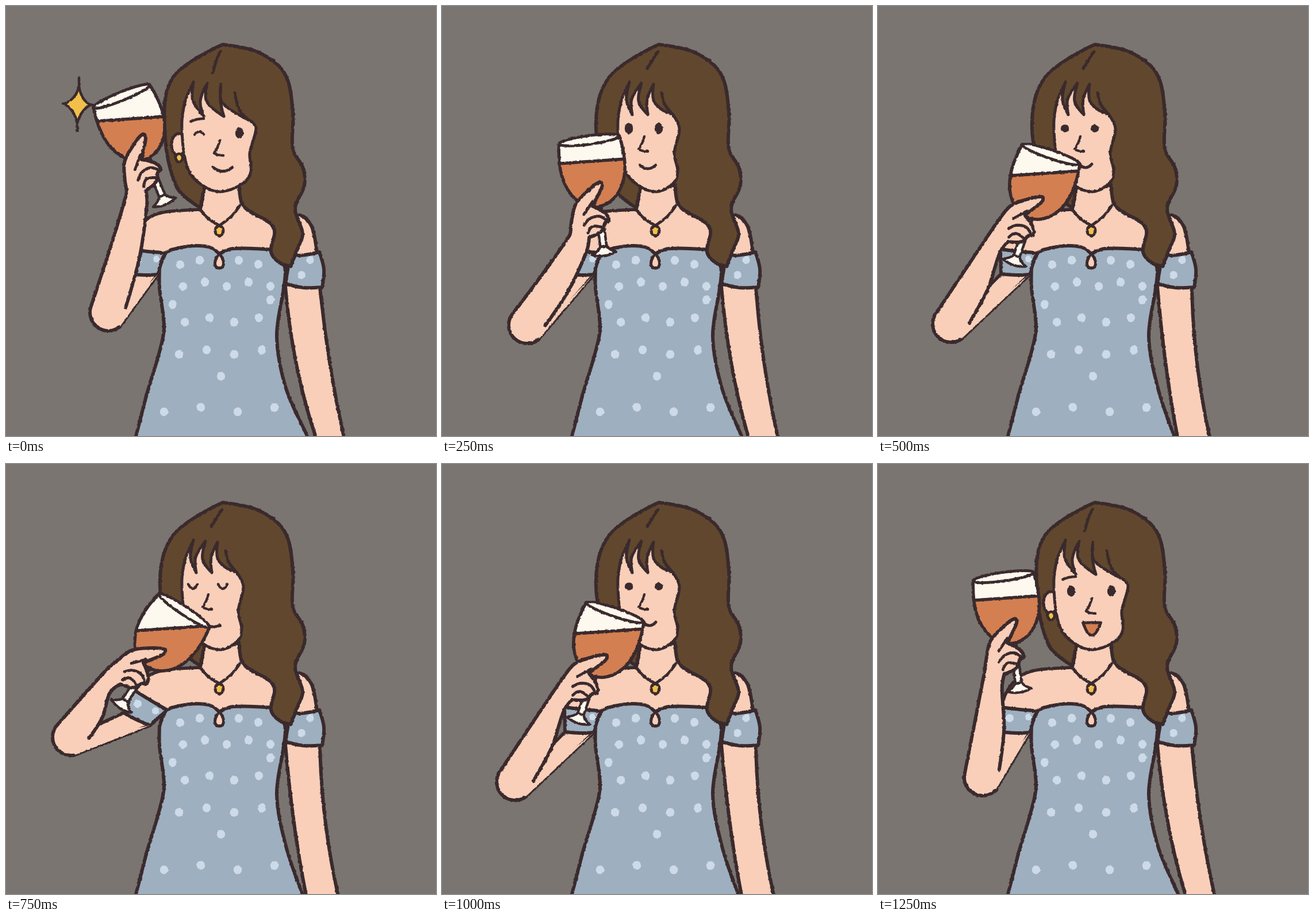
An HTML page for the animation above (1500 ms loop, 748 by 748 pixels).

```html
<!DOCTYPE html>
<html lang="en">
<head>
<meta charset="utf-8">
<title>Cheers</title>
<style>
html, body { margin: 0; width: 100%; height: 100%; overflow: hidden; background: #7a7571; }
svg { display: block; width: 100%; height: 100%; }
</style>
</head>
<body>
<svg id="stage" viewBox="0 0 748 748" fill="none" stroke-linecap="round" stroke-linejoin="round">
  <filter id="rough" filterUnits="userSpaceOnUse" x="0" y="0" width="748" height="748" color-interpolation-filters="sRGB">
    <feTurbulence type="fractalNoise" baseFrequency="0.2" numOctaves="2" seed="4"/>
    <feDisplacementMap in="SourceGraphic" scale="3" xChannelSelector="R" yChannelSelector="G"/>
  </filter>
  <clipPath id="inBowl"><path id="bowl"/></clipPath>
</svg>
<script>
const INK = '#3a2a2d', SKIN = '#f9cfb9', HAIR = '#61472d', DRESS = '#9eafbf', SPOT = '#cddbe9',
      BEER = '#d37f52', CREAM = '#fdf9ee', GOLD = '#f2c04a';
const STEP = 250, ORDER = [0, 1, 2, 3, 2, 4];

// glass: rim centre and tilt; side: head turned to the viewer's right; lift: raised sleeve
const POSES = [
  { glass: [201, 157, -22], elbow: [178, 533], sway: 18, side: 1, lift: 0,
    eyes: ['wink', 'open'], mouth: [377, 284, 34, 7], star: true },
  { glass: [256, 233, -7.5], elbow: [148, 555], sway: 12, side: 0, lift: 0,
    eyes: ['open', 'open'], mouth: [358, 280, 27, 6] },
  { glass: [301, 258, 18.8], elbow: [127, 553], sway: 0, side: 0, lift: 0,
    eyes: ['round', 'round'], mouth: [361, 278, 22, 6] },
  { glass: [310, 255, 33.5], elbow: [113, 475], sway: 1, side: 0, lift: 25,
    eyes: ['closed', 'closed'], mouth: [361, 282, 22, 3] },
  { glass: [218, 196, -8], elbow: [182, 545], sway: 14, side: 1, lift: 0,
    eyes: ['open', 'open'], mouth: [372, 287, 31, 22] }
];

const BOWL = 'M-53 0C-60 40 -58 75 -36 100Q-20 117 0 117Q20 117 36 100C58 75 60 40 53 0';
// Hand outline and finger creases, measured from the rim centre of the glass.
const HAND = '-29,190 -22,168 / -4,163 4,157 / 9,146 16,143 10,129 -9,115 / 1,100 12,82 9,75 -12,86 -38,108 -50,140 -56,161';
const CREASES = ['-8,107 -26,127', '-28,146 -17,136 0,134 13,144', '-23,160 -14,150 3,154'];
const SHOULDER = '213,428 222,400 240,375 265,361 300,356 338,354 / 341,340 345,316';
const NECKLINE = '278,430 300,421 330,417 355,420 371,431 / 395,422 466,424';
const HINGE = [285, 430], ELBOW_R = 32;
const SPOT_ROWS = [[446, 303, 34, 5], [484, 308, 38, 5], [515, 290, 170, 2], [546, 311, 43, 4],
                   [602, 301, 48, 4], [640, 374, 0, 1], [702, 275, 64, 4]];

const parse = text => text.split('/').map(s => s.trim().split(/\s+/).map(p => p.split(',').map(Number)));
const move = (p, v, k) => [p[0] + v[0] * k, p[1] + v[1] * k];
const normal = v => [-v[1], v[0]];
const mid = (a, b) => [(a[0] + b[0]) / 2, (a[1] + b[1]) / 2];

function unit(a, b) {
  const x = b[0] - a[0], y = b[1] - a[1], len = Math.hypot(x, y) || 1;
  return [x / len, y / len];
}

function rotate([x, y], deg) {
  const c = Math.cos(deg * Math.PI / 180), s = Math.sin(deg * Math.PI / 180);
  return [x * c - y * s, x * s + y * c];
}

// Smooth line through each run of points; runs meet in sharp corners.
function curve(source) {
  const runs = typeof source === 'string' ? parse(source) : source;
  let d = '', last = null;
  for (const run of runs) {
    const p = last ? [last, ...run] : run;
    if (!last) d = 'M' + p[0];
    const slope = i => i && i < p.length - 1 ? unit(p[i - 1], p[i + 1]) : [0, 0];
    for (let i = 1; i < p.length; i++) {
      const reach = Math.hypot(p[i][0] - p[i - 1][0], p[i][1] - p[i - 1][1]) / 3;
      d += `C${move(p[i - 1], slope(i - 1), reach)} ${move(p[i], slope(i), -reach)} ${p[i]}`;
    }
    last = p[p.length - 1];
  }
  return d;
}

function add(parent, tag, attrs) {
  const el = document.createElementNS('http://www.w3.org/2000/svg', tag);
  for (const k in attrs) el.setAttribute(k, attrs[k]);
  return parent.appendChild(el);
}
const path = (g, d, fill = 'none', width = 6) =>
  add(g, 'path', { d, fill, stroke: width ? INK : 'none', 'stroke-width': width });
const oval = (g, cx, cy, rx, ry, fill, width = 0) =>
  add(g, 'ellipse', { cx, cy, rx, ry, fill, stroke: width ? INK : 'none', 'stroke-width': width });
const arc = (x, y, w, dip) => `M${x - w / 2} ${y - dip / 2}Q${x} ${y + dip * 1.5} ${x + w / 2} ${y - dip / 2}`;

function drawFarArm(g, sway) {
  const inner = `M486 488Q498 630 ${521 + sway} 750`;
  const outer = `${577 + sway * 0.6} 750Q${548 + sway * 0.6} 620 546 488`;
  path(g, `${inner}L${outer}`, SKIN, 0);
  path(g, `${inner}M${outer}`);
  path(g, curve('494,362 506,363 520,368 533,387 541,430') + 'L480 445', SKIN);
  path(g, curve('494,435 520,433 545,428 / 553,458 550,489 / 518,490 486,483') + 'Z', DRESS);
  oval(g, 529, 442, 6.5, 7, SPOT);
  oval(g, 514, 468, 7, 7, SPOT);
}

function drawSleeve(g, lift) {
  const s = add(g, 'g', { transform: `rotate(${lift} ${HINGE})` });
  path(s, curve('213,423 246,427 280,430 / 264,467 / 240,468 214,466') + 'Z', DRESS);
  oval(s, 229, 442, 7, 7, SPOT);
  oval(s, 262, 440, 6, 6, SPOT);
}

function drawDress(g, sway) {
  const hem = 515 + sway / 2;
  path(g, curve(`219,770 226,748 245,675 266,605 275,560 267,490 267,457 / ${NECKLINE} / 485,455 ` +
    `483,490 471,575 487,665 ${hem},748 ${hem + 10},770`) + 'Z', DRESS);
  SPOT_ROWS.forEach(([y, x, gap, n]) => {
    for (let i = 0; i < n; i++) oval(g, x + gap * i, y + 4 * Math.cos(3 * i), 7.2, 7.6, SPOT);
  });
  path(g, 'M371 431C381 442 381 456 371 456C361 456 361 442 371 431Z', SKIN, 5);
}

function drawHead(g, { side, eyes, mouth }) {
  path(g, curve(`377,67 440,81 485,118 499,185 499,250 516,280 519,312 503,352 516,396 508,420 495,453 / ` +
    `475,446 461,428 465,385 413,348 406,312 / 345,316 / 338,351 / 297,315 ${268 + 8 * side},215 290,125 377,67`) + 'Z', HAIR);
  if (side) {
    oval(g, 300, 241, 12, 19, SKIN, 5);
    oval(g, 301, 264, 6, 7, GOLD, 4.5);
  }

  // fringe: locks hang from peaks to pointed tips
  const peak = i => [326 + (21 + 3 * side) * i, 132 + 2 * i];
  let fringe = '';
  for (let i = 0; i < 2; i++) {
    const [px, py] = peak(i), [nx, ny] = peak(i + 1);
    const x = 331 + 27 * i + side * (13 + 8 * i), y = 189 + 3 * side;
    fringe += `${px},${py} / ${px - 5 + 4 * side},${py + 32} ${x},${y} / ${x - 1 - 5 * side},${y - 27} ${nx},${ny} / `;
  }
  const tip = [401 + 26 * side, 188 + 13 * side];
  path(g, curve(`308,245 306,200 312,165 ${fringe}${368 + 6 * side},164 ${382 + 8 * side},180 ${tip} / ` +
    `${413 + 22 * side},213 ${404 + 20 * side},256 ${410 + 16 * side},288 ${403 + 10 * side},308 ` +
    '374,323 343,313 318,287 308,245') + 'Z', SKIN, 5);
  path(g, curve(`${tip[0] - 19 - 10 * side},151 ${tip[0] - 14 - 6 * side},${tip[1] - 18} ${tip}`), 'none', 5);
  path(g, curve(`${376 - 3 * side},79 366,94 ${357 + 3 * side},${109 + 7 * side}`), 'none', 5);

  const height = { open: 9.7, round: 6.7 };
  eyes.forEach((kind, i) => {
    const x = 325 + 11 * side + i * (52 + 18 * side), y = 213 + 8 * side;
    if (height[kind]) oval(g, x, y, 7.2, height[kind], INK);
    else path(g, arc(x, y, 16, kind === 'wink' ? -5 : 8), 'none', 4.5);
  });
  if (side) path(g, 'M321 201Q331 196 344 196', 'none', 4.5);
  const nose = [352 + 20 * side, 227 + 7 * side];
  path(g, `M${nose}q-4 14 -10 22q6 4 16 4`, 'none', 4.5);
  const open = mouth[3] > 15;
  path(g, arc(...mouth) + (open ? 'Z' : ''), open ? BEER : 'none', 5);
}

function drawGlass(g, [x, y, tilt]) {
  const glass = add(g, 'g', { transform: `translate(${x} ${y}) rotate(${tilt})` });
  path(glass, 'M-5 117L-5 189L6 189L6 117Z', CREAM, 4.5);
  path(glass, 'M-5 187Q-9 194 -21 199Q0 208 21 199Q10 194 6 187Z', CREAM, 4.5);
  path(glass, BOWL, CREAM, 0);
  // the beer stays level while the glass tips
  add(add(glass, 'g', { 'clip-path': 'url(#inBowl)' }), 'rect', {
    x: -130, y: 0, width: 260, height: 160, fill: BEER, stroke: INK, 'stroke-width': 5.5,
    transform: `rotate(${-tilt}) translate(0 ${36 - tilt * 0.2}) rotate(-4)` });
  path(glass, BOWL, 'none', 5.5);
  oval(glass, 0, 0, 53, 7.5, CREAM, 5);
}

function drawNearArm(g, { glass, elbow, lift }) {
  const [x, y, tilt] = glass, r = ELBOW_R;
  const held = text => parse(text).map(run => run.map(p => move([x, y], rotate(p, tilt), 1)));
  const hand = held(HAND), wrist = hand[0][0], heel = hand[3][hand[3].length - 1];
  const along = unit(elbow, mid(wrist, heel)), across = normal(along);
  const pit = armpit(lift);
  const bend = move(move(elbow, across, r * 0.85), along, r / 2);
  hand[0].unshift(bend, move(mid(bend, wrist), across, 6));
  hand[3].push(move(elbow, across, -r));
  const under = move(elbow, normal(unit(elbow, pit)), r);
  path(g, `${curve(hand)}A${r} ${r} 0 0 0 ${under}L${pit}`, SKIN, 0);
  path(g, `${curve(hand)}A${r} ${r} 0 0 0 ${under}`);
  CREASES.forEach(c => path(g, curve(held(c)), 'none', 5));
}

const onSleeve = (p, lift) => move(HINGE, rotate(unhinge(p), lift), 1);
const unhinge = p => move(p, HINGE, -1);
const armpit = lift => onSleeve([264, 467], lift);

function drawUpperArm(g, { elbow, lift }) {
  const pit = armpit(lift), under = move(elbow, normal(unit(elbow, pit)), ELBOW_R);
  path(g, `M${pit}L${under}L${elbow}L${onSleeve([214, 466], lift)}Z`, SKIN);
}

function drawStar(g) {
  path(g, 'M127 140Q121 163 101 170Q119 180 124 204Q130 181 147 172Q131 164 127 140Z', GOLD, 4.5);
  path(g, 'M127 125V140M124 204V217M99 170H103M146 172H151', 'none', 4.5);
}

function draw(pose) {
  const g = add(stage, 'g', { filter: 'url(#rough)', display: 'none' });
  drawFarArm(g, pose.sway);
  drawUpperArm(g, pose);
  path(g, curve(SHOULDER) + 'L348 290L404 290L406 345L505 362L480 445L290 445Z', SKIN, 0);
  path(g, curve(SHOULDER), 'none', 5.5);
  drawSleeve(g, pose.lift);
  drawDress(g, pose.sway);
  path(g, curve('337,353 350,368 371,382 / 392,366 407,347'), 'none', 5);
  oval(g, 371, 391, 7, 8.5, GOLD, 5);
  drawHead(g, pose);
  if (pose.star) drawStar(g);
  drawGlass(g, pose.glass);
  drawNearArm(g, pose);
  return g;
}

const stage = document.getElementById('stage');
document.getElementById('bowl').setAttribute('d', BOWL);
const views = POSES.map(draw);
const start = performance.now();
let shown = -1;

function tick() {
  const next = ORDER[Math.floor((performance.now() - start) / STEP) % ORDER.length];
  if (next !== shown) {
    views.forEach((v, i) => v.setAttribute('display', i === next ? 'inline' : 'none'));
    shown = next;
  }
  requestAnimationFrame(tick);
}
tick();
</script>
</body>
</html>
```
